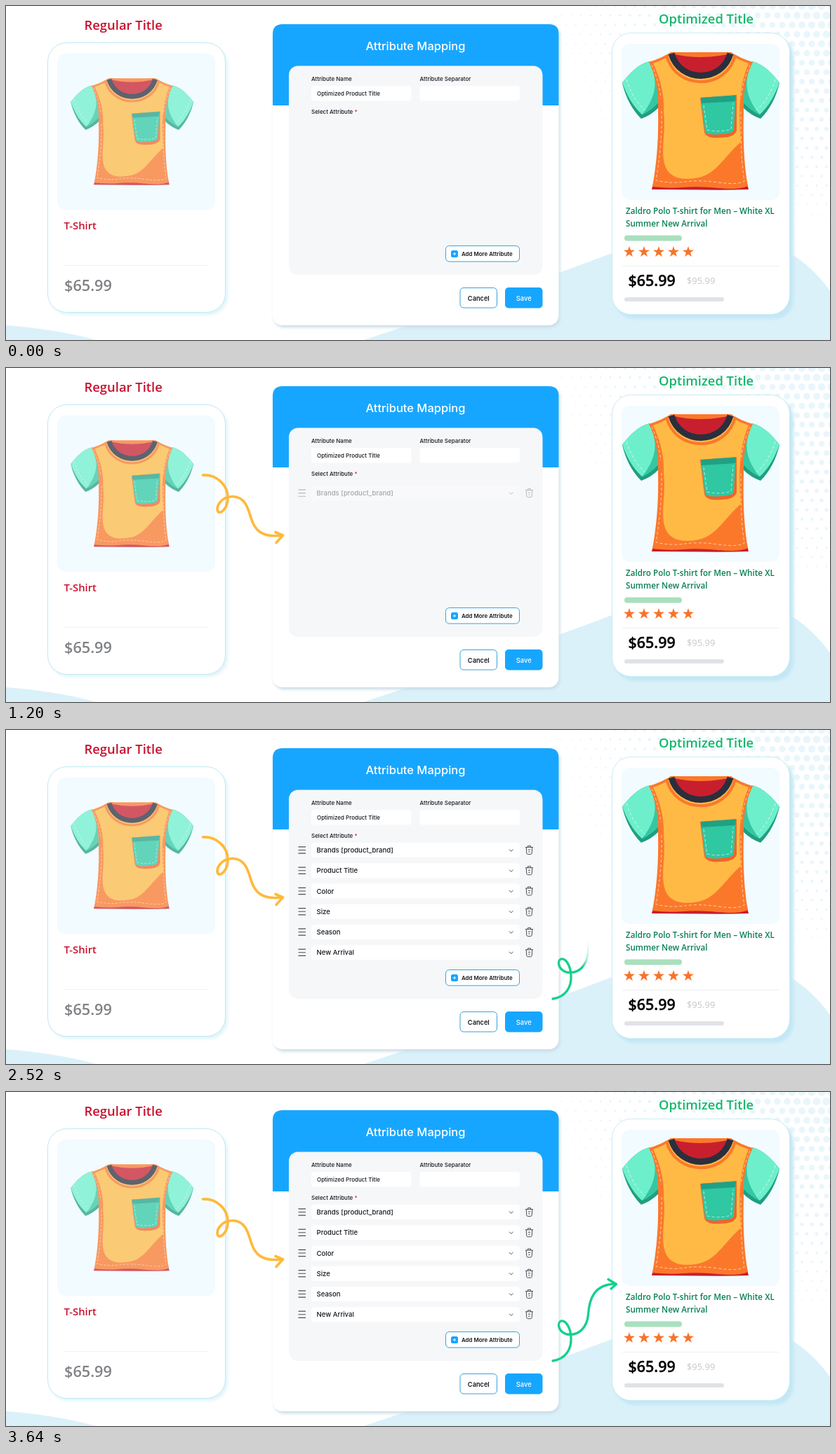
Animation, 1174 px wide and 477 px high, one loop 4040 ms. Source, as an HTML page:

```html
<!DOCTYPE html>
<html lang="en">
<head>
<meta charset="utf-8">
<title>Attribute Mapping</title>
<style>
  html, body { margin: 0; width: 100%; height: 100%; overflow: hidden; background: #fff; }
  svg { display: block; }
  .ui { font-family: Inter, "Noto Sans", sans-serif; font-weight: 500; fill: #16181d; }
  .card { font-family: "Open Sans", "Noto Sans", sans-serif; font-weight: 600; }
  .stitch { fill: none; stroke: #fff; stroke-opacity: .7; stroke-width: .9; stroke-dasharray: 4 3; }
  .arrow { fill: none; stroke-linecap: round; stroke-linejoin: round; }
</style>
</head>
<body>
<svg width="1174" height="477" viewBox="0 0 1174 477">
  <defs>
    <filter id="soft" x="-10%" y="-10%" width="120%" height="120%"><feGaussianBlur stdDeviation="2"/></filter>
    <linearGradient id="yellow" gradientUnits="userSpaceOnUse" x1="-10" x2="0">
      <stop stop-color="#ffb93b"/><stop offset="1" stop-color="#ffb93b" stop-opacity="0"/>
    </linearGradient>
    <linearGradient id="green" gradientUnits="userSpaceOnUse" x1="-10" x2="0">
      <stop stop-color="#14d08c"/><stop offset="1" stop-color="#14d08c" stop-opacity="0"/>
    </linearGradient>
    <g id="sleeve">
      <path fill="#1f9f82" d="M917 79C900 83 888 97 878 110C883 131 892 148 905 161Q919 156 930 145L927 100Z"/>
      <path fill="#6eefcb" d="M917 79C900 83 888 97 878 109C884 127 893 143 906 155Q918 150 929 138L927 100Z"/>
      <path fill="#35c7a2" d="M923 98C927 114 924 132 908 153L906 155Q918 150 929 138L927 100Z"/>
      <path class="stitch" d="M884 105C890 124 899 139 911 149"/>
    </g>
    <g id="shirt">
      <use href="#sleeve"/>
      <use href="#sleeve" transform="matrix(-1 0 0 1 1980 0)"/>
      <path fill="#c81f2e" d="M922 254L920 262Q955 262 990 262.500T1058 262L1056 254Z"/>
      <path fill="#fb782b" d="M947 66C938 72 926 77 916 80C925 98 930 122 929 150C930 190 927 225 921 258Q945 261 965 259T1015 260T1057 257C1051 225 1050 185 1051 150C1050 122 1055 98 1064 80C1054 77 1042 72 1033 66Z"/>
      <path fill="#ffba45" d="M945 71C938 76 930 79 922 82C932 103 938 125 937 150C940 178 934 200 937 220C941 246 962 250 987 245C1012 240 1023 215 1047 194C1043 150 1045 112 1058 82C1050 79 1042 76 1035 71Z"/>
      <path fill="none" stroke="#fb782b" stroke-width="4" d="M941 70C953 121 1027 121 1039 70"/>
      <path fill="#c81f2e" d="M951 67Q990 75 1029 67C1018 108 962 108 951 67Z"/>
      <path fill="none" stroke="#fb782b" stroke-width="3" d="M951 67Q990 76 1029 67"/>
      <path fill="none" stroke="#2b2f3d" stroke-width="9" d="M948 68C960 110 1020 110 1032 68"/>
      <path class="stitch" d="M934 150C935 185 931 220 926 249Q947 254 967 251T1015 252T1052 250C1047 220 1047 185 1047 150"/>
      <path class="stitch" d="M920 84Q930 106 933 132M1060 84Q1050 106 1047 132"/>
      <path fill="#f0642a" d="M989 131L1041 127L1041 178Q1038 188 1018 188Q998 190 995 180Z"/>
      <path fill="#30c7a3" d="M990 131L1040 127.500L1037 177Q1036 182 1018 183Q998 185 996 179Z"/>
      <path fill="#1fa185" d="M990 131L1040 127.500L1039 136L991 139Z"/>
      <path class="stitch" d="M994 142L999 177Q1016 181 1033 176L1036 139"/>
    </g>
  </defs>

  <g id="dots" fill="#e9f6fc"></g>
  <g fill="#daf1fa">
    <path d="M0 456C40 459 90 466 128 477H0Z"/>
    <path d="M510 477C620 440 740 400 863 353C950 320 1050 325 1117 353Q1150 373 1174 407V477Z"/>
  </g>

  <!-- left card -->
  <g class="card">
    <rect x="62" y="56" width="254" height="385" rx="27" fill="#dff4fa" filter="url(#soft)"/>
    <rect x="59.500" y="52.500" width="253" height="385" rx="27" fill="#fff" stroke="#bfe8f3"/>
    <rect x="73" y="68" width="225" height="223" rx="12" fill="#f2fbff"/>
    <use href="#shirt" transform="translate(-593.500 52) scale(.781 .776)" opacity=".74"/>
    <text x="111.500" y="33.500" font-size="18.400" fill="#c8102e">Regular Title</text>
    <text id="plain" x="82.500" y="319" font-size="14.800">T-Shirt</text>
    <path d="M83 370.500H288" stroke="#eff0f1"/>
    <text x="83" y="407" font-size="21.700" fill="#808285">$65.99</text>
  </g>

  <!-- right card -->
  <g class="card">
    <rect x="868" y="44" width="254" height="403" rx="27" fill="#c3e7f4" filter="url(#soft)"/>
    <rect x="863.500" y="38.500" width="253" height="402" rx="27" fill="#fff" stroke="#c9ebf4"/>
    <rect x="877" y="54" width="225" height="223" rx="12" fill="#f2fbff"/>
    <use href="#shirt"/>
    <text x="930" y="25.200" font-size="18.400" fill="#12b76a">Optimized Title</text>
    <g id="rich" font-size="11.700">
      <text x="883" y="296.500">Zaldro Polo T-shirt for Men – White XL</text>
      <text x="883" y="315">Summer New Arrival</text>
    </g>
    <rect x="881" y="327.500" width="82" height="8" rx="4" fill="#a9e0bd"/>
    <g id="stars" fill="#f97228"></g>
    <path d="M878 371.500H1101" stroke="#eff0f1"/>
    <text x="886.500" y="399.500" font-size="21.500" fill="#000" stroke="#000" stroke-width=".3">$65.99</text>
    <text x="970" y="396.500" font-size="12.900" font-weight="400" fill="#c4c7cb">$95.99</text>
    <rect x="881" y="416" width="142" height="6" rx="3" fill="#e0e3e6"/>
  </g>

  <!-- dialog -->
  <g class="ui">
    <rect x="382" y="29" width="407" height="430" rx="14" fill="#c9dbe6" filter="url(#soft)"/>
    <rect x="380" y="26" width="407.500" height="430" rx="14" fill="#fff"/>
    <path fill="#17a6ff" d="M380 142V40Q380 26 394 26H773.500Q787.500 26 787.500 40V142Z"/>
    <text x="583.500" y="62.500" font-size="16.500" text-anchor="middle" style="fill:#fff">Attribute Mapping</text>
    <rect x="403" y="85.500" width="361.500" height="298.500" rx="13" fill="#f6f7f9"/>
    <g font-size="8">
      <text x="435" y="106.500">Attribute Name</text>
      <text x="589.500" y="106.500">Attribute Separator</text>
      <rect x="435" y="114" width="142.500" height="21.500" rx="4" fill="#fff"/>
      <rect x="589.500" y="114" width="142.500" height="21.500" rx="4" fill="#fff"/>
      <text x="443" y="127.500">Optimized Product Title</text>
      <text x="435" y="154">Select Attribute <tspan fill="#e0202f">*</tspan></text>
    </g>
    <rect x="626.500" y="342.500" width="105" height="22.500" rx="5" fill="#fff" stroke="#36a3d9"/>
    <rect x="634" y="349" width="10" height="10" rx="2.500" fill="#17a6ff"/>
    <path d="M637 354H641M639 352V356" stroke="#fff"/>
    <text x="649" y="356.500" font-size="7.900" font-weight="600">Add More Attribute</text>
    <rect x="647" y="402.500" width="52.500" height="28.500" rx="5" fill="#fff" stroke="#36a3d9"/>
    <text x="673.300" y="420.500" font-size="9.200" font-weight="600" text-anchor="middle">Cancel</text>
    <rect x="711" y="402" width="53.500" height="29.500" rx="5" fill="#17a6ff"/>
    <text x="737.700" y="420.500" font-size="9.400" text-anchor="middle" style="fill:#fff">Save</text>
    <g id="rows" font-size="9.600"></g>
  </g>

  <g class="arrow" stroke="url(#yellow)" stroke-width="3.700">
    <path d="M280.500 153C300 152 316 167 316 185C316 199 308 207 303 206C297 201 305 183.500 323 183.500C341 184 345 201 349 214C354 231 364 243 394 239"/>
    <path d="M384 234.500L394.500 239L385 249.500"/>
  </g>
  <g class="arrow" stroke="url(#green)" stroke-width="3.300">
    <path d="M779 384C798 381 806 367 805 350C804 335 797 326 791 327C785 329 786 342 799 346C817 349 828 335 829.500 318C831 295 838 275 868 274"/>
    <path d="M858 267.500L869.500 274.500L862 281"/>
  </g>
</svg>
<script>
const LOOP = 4040, STEP = 40;
const ROW_START = 1128, ROW_TIME = 200;
const $ = id => document.getElementById(id);
const progress = (t, start, length) => Math.min(1, Math.max(0, (t - start) / length));
const mix = (a, b, p) => `rgb(${a.map((v, i) => Math.round(v + (b[i] - v) * p))})`;

// Halftone that grows towards the top right corner
let dots = '';
for (let row = 0; row < 26; row++) {
  for (let col = 0; col < 42; col++) {
    const x = 616 + col * 14 + row % 2 * 7, y = row * 13.5;
    const r = 6 * Math.max(0, (x - 620) / 554) ** 1.5 * (1 - y / 360);
    if (r > 0.3) dots += `<circle cx="${x}" cy="${y}" r="${r.toFixed(2)}"/>`;
  }
}
$('dots').innerHTML = dots;

const star = cx => {
  const points = Array.from({ length: 10 }, (_, i) => {
    const r = i % 2 ? 3.3 : 8.4, a = i * Math.PI / 5;
    return `${(cx + r * Math.sin(a)).toFixed(1)},${(351.3 - r * Math.cos(a)).toFixed(1)}`;
  });
  return `<polygon points="${points.join(' ')}"/>`;
};
$('stars').innerHTML = [888, 909, 930, 951, 972].map(star).join('');

const labels = ['Brands [product_brand]', 'Product Title', 'Color', 'Size', 'Season', 'New Arrival'];
$('rows').innerHTML = labels.map(label => `<g>
  <rect x="435" y="-10.500" width="297" height="21" rx="4" fill="#fff"/>
  <text x="442.500" y="3.700">${label}</text>
  <g fill="none" stroke="#4b4f55">
    <path stroke-width="1.200" d="M416.500 -4.700H427M416.500 0H427M416.500 4.700H427"/>
    <path d="M717 -1L719.700 1.700L722.400 -1"/>
    <path d="M740 -4H751M743.500 -4V-6H747.500V-4M741.200 -4L741.800 4.500Q742 6 743.500 6H747.500Q749 6 749.200 4.500L749.800 -4M743.800 -.5H747.200M744.300 2.500H746.700"/>
  </g></g>`).join('');
const rows = [...$('rows').children];

function pulse(id, x, y, p, from, to) {
  const amount = Math.sin(Math.PI * p);
  $(id).setAttribute('transform', `translate(${x} ${y}) scale(${1 + 0.19 * amount}) translate(${-x} ${-y})`);
  $(id).setAttribute('fill', mix(from, to, amount));
}

function wipe(id, from, to, p) {
  $(id).setAttribute('gradientTransform', `translate(${from + (to - from) * p} 0)`);
}

function draw(now) {
  const t = Math.floor(now % LOOP / STEP) * STEP;
  pulse('plain', 83, 313.5, progress(t, 60, 600), [200, 16, 46], [222, 32, 58]);
  pulse('rich', 989.5, 301, progress(t, 2710, 600), [10, 128, 84], [18, 183, 118]);
  rows.forEach((row, i) => {
    const p = progress(t, ROW_START + i * ROW_TIME, ROW_TIME);
    row.setAttribute('transform', `translate(0 ${171.5 + 29.25 * i + 11 * (1 - p)})`);
    row.setAttribute('opacity', p);
  });
  wipe('yellow', 276, 408, progress(t, 690, 430));
  wipe('green', 775, 883, progress(t, 2328, 370));
  requestAnimationFrame(draw);
}
draw(performance.now());
</script>
</body>
</html>
```
